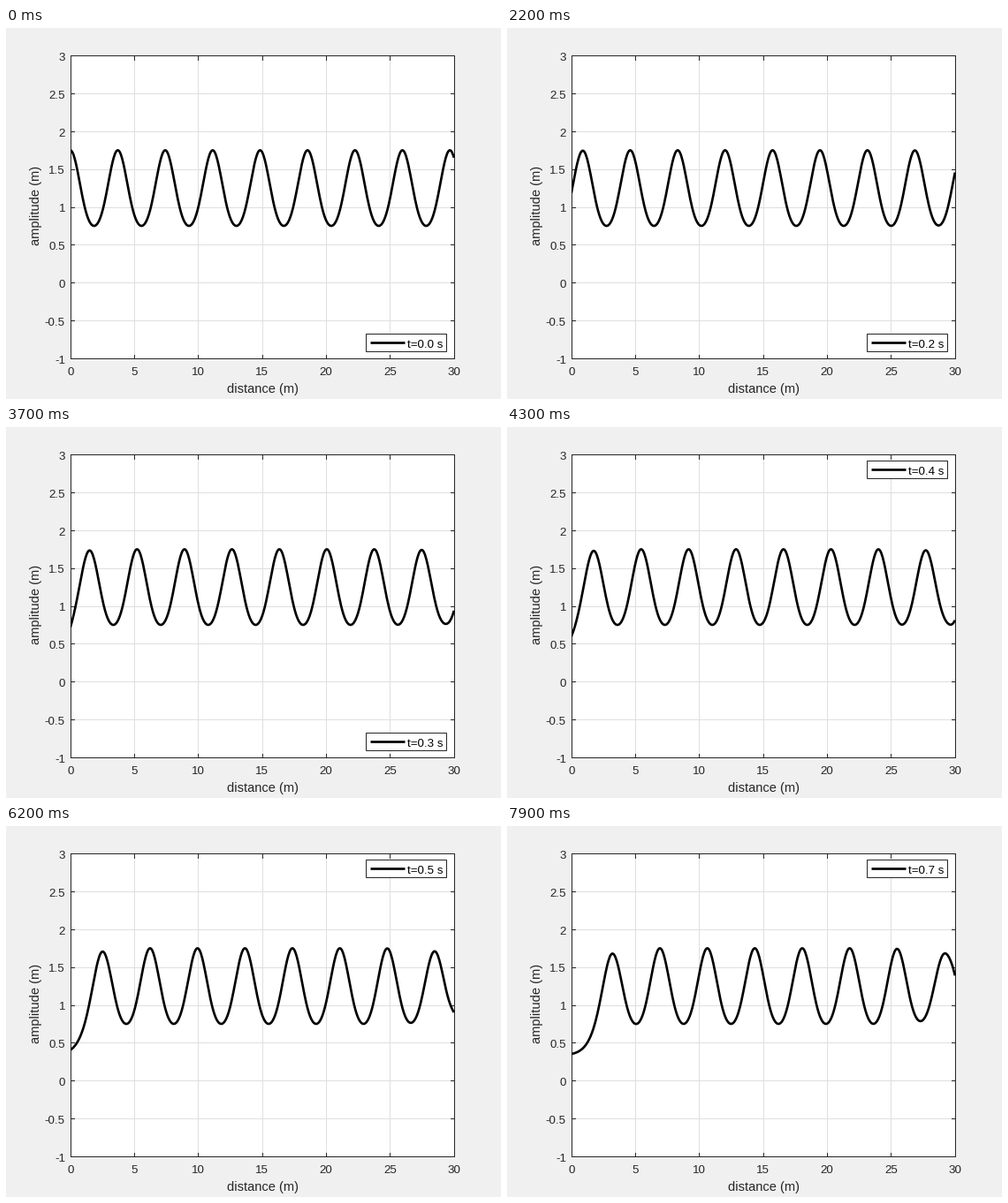
A matplotlib script that plays this animation: 560 by 420 pixels, repeating every 8000 ms.

```python
import numpy as np
import matplotlib.pyplot as plt
from matplotlib.animation import FuncAnimation
from matplotlib.patches import Rectangle

W, H, DPI = 560, 420, 100
FRAMES, INTERVAL = 80, 100
PT = 72 / DPI                      # points per pixel
L, R, T, B = 72.8, 506.8, 31.4, 373.8
INK, GRID = "#262626", "#dfdfdf"
WAVELEN, STEP, DT = 3.71, 0.0407, 0.0088
LEGEND_MOVE = 40                   # frame at which the legend jumps up
LOW, HIGH = 346, 38                # legend tops

plt.rcParams["font.family"] = "Liberation Sans"
plt.rcParams["axes.unicode_minus"] = False

fig = plt.figure(figsize=(W / DPI, H / DPI), dpi=DPI, facecolor="#f0f0f0")
ax = fig.add_axes([0, 0, 1, 1])
ax.set(xlim=(0, W), ylim=(H, 0))
ax.axis("off")


def px(x):
    return L + (R - L) * x / 30


def py(y):
    return B - (B - T) * (y + 1) / 4


def stroke(xs, ys, width=1.0, color=INK, **kw):
    return ax.plot(xs, ys, color=color, lw=width * PT, **kw)[0]


def label(x, y, s, size=13.33, color=INK, **kw):
    return ax.text(x, y, s, fontsize=size * PT, color=color, va="baseline", **kw)


def wave(x, n):
    """Surface height: a travelling train with disturbed ends."""
    s = STEP * n
    th = 2 * np.pi * (x - s) / WAVELEN
    y = 1.2 + 0.5 * np.cos(th) + 0.05 * np.cos(2 * th)

    # right wall: damped swing and a local swell
    z = 30 - x
    damp = 0.17 * (n / 79) ** 2 * np.exp(-(z / 2.9) ** 2)
    y = 1.25 + (y - 1.25) * (1 - damp)
    swell = np.interp(n, [0, 20, 43, 55, 70, 79], [0, 0, -0.04, 0, 0.11, 0.14])
    y += swell * np.exp(-(z / 0.5) ** 2)

    # left wall: the first crest leaves a low tail behind it
    drop = 0.07 * (s / 3.2) ** 2
    d = x - s
    tail = 0.33 + (1.42 - drop) / np.cosh((0.815 + 0.014 * s) * d) ** 2
    return np.where(d < 0, tail, y - drop * np.exp(-(d / 0.9) ** 2))


# axes
ax.add_patch(Rectangle((L, T), R - L, B - T, fc="white", ec="none", zorder=0))
for v in range(0, 31, 5):
    x = px(v)
    if 0 < v < 30:
        stroke([x, x], [T, B], color=GRID, zorder=1)
    for edge, inward in ((T, 4.3), (B, -4.3)):
        stroke([x, x], [edge, edge + inward], zorder=2)
    label(x, 393, str(v), ha="center")
for v in np.arange(-1, 3.1, 0.5):
    y = py(v)
    if -1 < v < 3:
        stroke([L, R], [y, y], color=GRID, zorder=1)
    for edge, inward in ((L, 4.3), (R, -4.3)):
        stroke([edge, edge + inward], [y, y], zorder=2)
    label(67, y + 5.7, f"{v:g}", ha="right")
ax.add_patch(Rectangle((L, T), R - L, B - T, fc="none", ec=INK, lw=PT, zorder=2))
label(290, 413, "distance (m)", 14.67, ha="center")
label(38, 201, "amplitude (m)", 14.67, ha="center",
      rotation=90, rotation_mode="anchor")

# curve
xs = np.linspace(0, 30, 601)
curve = stroke(px(xs), py(wave(xs, 0)), 2.67, "black", zorder=3,
               solid_joinstyle="round", solid_capstyle="butt")
curve.set_clip_path(Rectangle((L, T), R - L + 1, B - T, transform=ax.transData))

# legend
box = Rectangle((407, LOW), 91, 20, fc="white", ec=INK, lw=PT, zorder=4)
ax.add_patch(box)
key = stroke([411.5, 451], [LOW + 10] * 2, 2.67, "black", zorder=5,
             solid_capstyle="butt")
caption = label(454, LOW + 16, "t=0.0 s", color="black", zorder=5)


def update(n):
    top = LOW if n < LEGEND_MOVE else HIGH
    curve.set_ydata(py(wave(xs, n)))
    box.set_y(top)
    key.set_ydata([top + 10] * 2)
    caption.set_y(top + 16)
    caption.set_text(f"t={n * DT:.1f} s")
    return curve, box, key, caption


anim = FuncAnimation(fig, update, frames=FRAMES, interval=INTERVAL,
                     repeat=True, repeat_delay=0)
plt.show()
```
